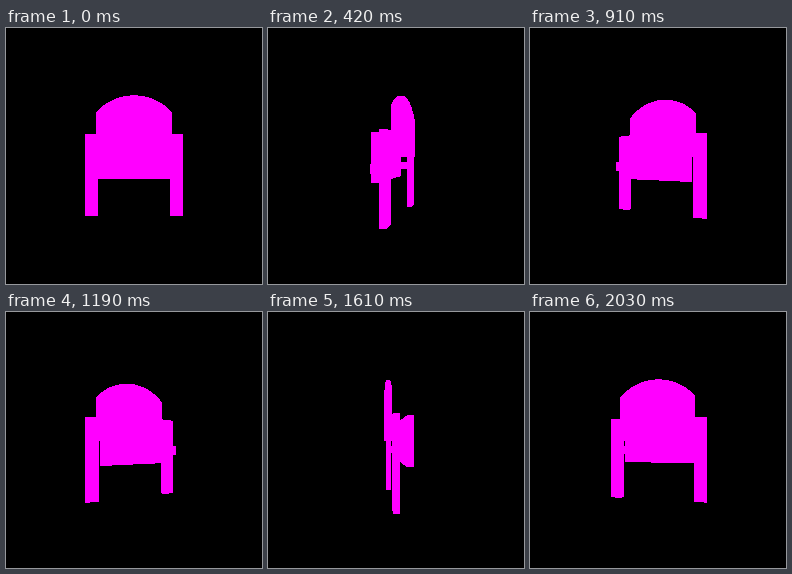
An HTML page that plays this animation: 256x256 px, repeating every 2100 ms.

```html
<!DOCTYPE html>
<html lang="en">
<head>
<meta charset="utf-8">
<title>Turning chair</title>
<style>
  html, body { margin: 0; height: 100%; overflow: hidden; background: #000; }
  svg { display: block; width: 100%; height: 100%; }
</style>
</head>
<body>
<svg viewBox="0 0 256 256"><path id="chair" fill="#f0f" shape-rendering="crispEdges"/></svg>
<script>
const STEPS = 30, STEP_MS = 70;
const CX = 128, CY = 129, DISTANCE = 222;
const path = document.getElementById('chair');

// A convex outline [x, y] pulled along z
const extrude = (outline, z0, z1) =>
  outline.flatMap(([x, y]) => [[x, y, z0], [x, y, z1]]);

const box = (x0, x1, y0, y1, z0, z1) =>
  extrude([[x0, y0], [x1, y0], [x1, y1], [x0, y1]], z0, z1);

// Backrest outline with a circular top
function archOutline(halfWidth, top, shoulder, bottom) {
  const rise = shoulder - top;
  const radius = (halfWidth ** 2 + rise ** 2) / (2 * rise);
  const spread = Math.asin(halfWidth / radius);
  const points = [[-halfWidth, bottom], [halfWidth, bottom]];
  for (let i = -12; i <= 12; i++) {
    const a = spread * i / 12;
    points.push([radius * Math.sin(a), top + radius * (1 - Math.cos(a))]);
  }
  return points;
}

const parts = [
  extrude(archOutline(36.4, -58.7, -42.5, 0), 7.1, 10.5),
  box(-36.8, 36.8, -21.6, 22.2, -11, -5.5)
];
for (const side of [-1, 1]) {
  parts.push(box(side * 35.5, side * 47.7, -22.2, 57, 1.7, 7.1));  // leg
  parts.push(box(side * 38, side * 45, 5.8, 14.2, -8, 5));         // rail
}

function project([x, y, z], angle) {
  const c = Math.cos(angle), s = Math.sin(angle);
  const scale = DISTANCE / (DISTANCE + x * s - z * c);
  return [CX + (x * c + z * s) * scale, CY + y * scale];
}

function hull(points) {
  const chain = list => {
    const out = [];
    for (const p of list) {
      while (out.length > 1) {
        const [a, b] = out.slice(-2);
        if ((b[0] - a[0]) * (p[1] - a[1]) > (b[1] - a[1]) * (p[0] - a[0])) break;
        out.pop();
      }
      out.push(p);
    }
    return out.slice(0, -1);
  };
  const sorted = [...points].sort((a, b) => a[0] - b[0] || a[1] - b[1]);
  return [...chain(sorted), ...chain(sorted.reverse())];
}

function draw(now) {
  const angle = Math.floor(now / STEP_MS) % STEPS / STEPS * 2 * Math.PI;
  path.setAttribute('d', parts.map(part => {
    const outline = hull(part.map(p => project(p, angle)));
    return 'M' + outline.map(p => p.map(v => v.toFixed(2))).join('L') + 'Z';
  }).join(''));
}

const start = performance.now();
function tick() {
  draw(performance.now() - start);
  requestAnimationFrame(tick);
}
tick();
</script>
</body>
</html>
```
